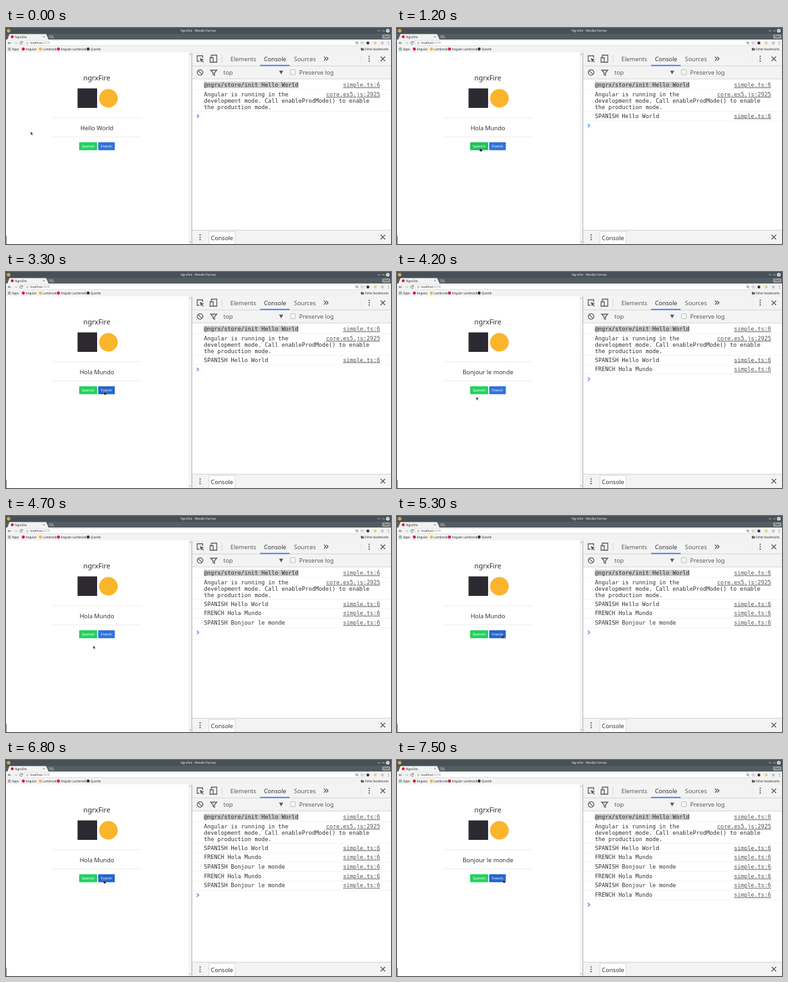
An HTML page that plays this animation: 600x338 px, repeating every 7.6 s.

```html
<!DOCTYPE html>
<html lang="en">
<head>
<meta charset="utf-8">
<title>NgrxFire</title>
<style>
  html, body { margin: 0; width: 100%; height: 100%; overflow: hidden; background: #fff; }
  svg { display: block; width: 100%; height: 100%; }
  text { font-family: "Noto Sans", "Open Sans", sans-serif; fill: #333; white-space: pre; }
  .tiny { font-size: 4.5px; }
  .ui { font-size: 9.25px; fill: #5a5a5a; }
  .mono { font-family: "DejaVu Sans Mono", monospace; font-size: 8.74px; fill: #303030; }
  .link { text-anchor: end; text-decoration: underline; fill: #545454; }
  .mid { text-anchor: middle; }
  .icon { fill: none; stroke: #5a5a5a; stroke-width: 1.3; }
  .nav { fill: none; stroke: #5a5a5a; stroke-width: .8; }
</style>
</head>
<body>
<svg viewBox="0 0 600 338" preserveAspectRatio="none">
  <rect width="600" height="338" fill="#fff"/>

  <!-- window frame and tabs -->
  <rect width="600" height="18.5" fill="#535c61"/>
  <rect width="600" height="9" fill="#475057"/>
  <circle cx="4" cy="4.3" r="2.8" fill="#d9a441"/>
  <text class="tiny mid" x="299.5" y="6" style="fill:#e8eaeb">NgrxFire - Wendle Harrow</text>
  <path d="M579.5 3.5l1.8 1.8 1.8-1.8M586.3 5.3l1.8-1.8 1.8 1.8" fill="none" stroke="#e4e6e7" stroke-width=".8"/>
  <circle cx="595" cy="4.3" r="2.8" fill="#eceeee"/>
  <path d="M594 3.3l2 2m0-2l-2 2" stroke="#475057" stroke-width=".7"/>
  <path d="M2 18.5L5 10.5Q5.4 9.6 6.4 9.6H61.5Q62.5 9.6 63 10.5L66.5 18.5Z" fill="#f2f2f2"/>
  <circle cx="9.7" cy="13.8" r="2.3" fill="#dd1b36"/>
  <text class="tiny" x="14" y="15.6">NgrxFire</text>
  <path d="M57.8 12.5l2.4 2.4m0-2.4l-2.4 2.4" stroke="#555" stroke-width=".6"/>
  <path d="M66 11.2h7.5l2 5h-7.5z" fill="#7c8488"/>
  <rect x="586.5" y="10.2" width="12" height="6.3" rx="1" fill="#a3a9ac"/>
  <text class="tiny mid" x="592.5" y="15">Ned</text>

  <!-- address bar and bookmarks -->
  <rect y="18" width="600" height="20" fill="#f2f2f2"/>
  <rect x="28.5" y="19.5" width="530" height="8" rx="1" fill="#fff" stroke="#c6c6c6" stroke-width=".5"/>
  <path class="nav" d="M8 23.5H3.3m2-2l-2 2 2 2"/>
  <path class="nav" style="stroke:#c2c2c2" d="M12.5 23.5h4.7m-2-2l2 2-2 2"/>
  <path class="nav" d="M25.2 22a2.1 2.1 0 1 0 .4 2M25.8 20.8v1.7h-1.7"/>
  <circle cx="33.3" cy="23.5" r="1.8" fill="none" stroke="#777" stroke-width=".5"/>
  <path d="M33.3 23v1.5" stroke="#777" stroke-width=".6"/>
  <text class="tiny" x="37.8" y="25.2">localhost<tspan fill="#999">:4200</tspan></text>
  <circle class="nav" cx="546.6" cy="23" r="1.5"/><path class="nav" d="M547.8 24.2l1.5 1.5"/>
  <path d="M554.8 21l.7 1.6 1.7.1-1.3 1.1.4 1.7-1.5-.9-1.5.9.4-1.7-1.3-1.1 1.7-.1z" fill="none" stroke="#777" stroke-width=".5"/>
  <circle cx="564" cy="23.5" r="2.3" fill="#353535"/>
  <circle cx="575.3" cy="23.5" r="2.3" fill="#e8c98a"/>
  <circle cx="586.5" cy="23.5" r="2.3" fill="#c4c4c4"/>
  <g fill="#666"><circle cx="596" cy="21.5" r=".6"/><circle cx="596" cy="23.5" r=".6"/><circle cx="596" cy="25.5" r=".6"/></g>
  <g id="apps"></g>
  <g id="bookmarks"></g>
  <path d="M553 31h2l.6.7h2.2v3.5H553z" fill="#666"/>
  <text class="tiny" x="559" y="34.6">Other bookmarks</text>

  <!-- page -->
  <rect x="284.5" y="38" width="5" height="300" fill="#f4f4f4"/>
  <path d="M285.6 42l1.4-1.8 1.4 1.8zM285.6 334l1.4 1.8 1.4-1.8z" fill="#999"/>
  <rect y="325" width=".8" height="13" fill="#555"/>
  <text class="mid" x="141.6" y="82.4" font-size="10.8">ngrxFire</text>
  <rect x="111.5" y="94.5" width="30.5" height="30.5" fill="#2c2a30"/>
  <circle cx="159.6" cy="110" r="14.5" fill="#fbb52c"/>
  <path d="M72 140.2H211M72 170.4H211" stroke="#dedede" stroke-width=".6"/>
  <text id="greeting" class="mid" x="141.7" y="159.7" font-size="9.35"></text>
  <rect id="spanish" x="114" y="178.8" width="28" height="12.4" rx="1"/>
  <rect id="french" x="143.6" y="178.8" width="26" height="12.4" rx="1"/>
  <text class="mid" x="128" y="186.8" font-size="5.4" style="fill:#fff">Spanish</text>
  <text class="mid" x="156.6" y="186.8" font-size="5.4" style="fill:#fff">French</text>

  <!-- developer tools -->
  <rect x="290" y="38" width="310" height="42" fill="#f3f3f3"/>
  <path d="M290 59.3H600M290 79.8H600" stroke="#cfcfcf" stroke-width=".8"/>
  <path d="M396 58.6H442" stroke="#3b79e6" stroke-width="1.6"/>
  <path class="icon" d="M306.5 47V43.5H298V52H301.5"/>
  <path d="M302 47l6.5 2.6-2.6 1.1 2.2 2.3-1 .9-2.2-2.3-1 2.4z" fill="#5a5a5a"/>
  <path class="icon" d="M320 46V42.5H328.5V53.5H323.5M318 46.5h5V53.5h-5z"/>
  <path d="M336.6 42V54" stroke="#ccc" stroke-width=".8"/>
  <text class="ui" x="349.8" y="51.5">Elements</text>
  <text class="ui" x="402" y="51.5" style="fill:#333">Console</text>
  <text class="ui" x="448.8" y="51.5">Sources</text>
  <path class="icon" d="M495.5 45l3 3-3 3M499 45l3 3-3 3"/>
  <path d="M553.3 42V54" stroke="#ddd" stroke-width=".6"/>
  <g id="menus" fill="#5a5a5a"></g>
  <path class="icon" d="M583.8 44.7l7 7m0-7l-7 7"/>
  <circle class="icon" cx="302.5" cy="69.6" r="4.3"/><path class="icon" d="M299.5 66.6l6 6"/>
  <path class="icon" d="M319 66h9.5l-3.6 4v4l-2.2-1.3V70z"/>
  <text class="ui" x="338.8" y="72.5">top</text>
  <path d="M425.6 66.8h6.4l-3.2 5.8z" fill="#5a5a5a"/>
  <rect x="443.3" y="65.3" width="7.6" height="7.6" rx="1" fill="#f7f7f7" stroke="#aaa" stroke-width=".8"/>
  <text class="ui" x="456.8" y="72.5">Preserve log</text>
  <rect x="308.3" y="84.2" width="147.6" height="9.8" fill="#c9c9c9"/>
  <g id="log"></g>
  <path id="prompt" d="M297.4 -2.7l3 2.7-3 2.7" fill="none" stroke="#4a86e8" stroke-width="1.3"/>
  <rect x="290" y="316.4" width="310" height="21.6" fill="#f3f3f3"/>
  <path d="M290 316.4H600" stroke="#c8c8c8" stroke-width=".8"/>
  <rect x="316.2" y="318.5" width="40.8" height="20" fill="#fff" stroke="#ccc" stroke-width=".7"/>
  <text class="ui" x="319.3" y="331.6" style="fill:#333">Console</text>
  <path class="icon" d="M583.8 323.7l7 7m0-7l-7 7"/>
  <g id="drawerMenu"></g>
  <path d="M289.7 38V338" stroke="#a8a8a8" stroke-width=".9"/>

  <g id="cursor">
    <path id="arrow" d="M0 0V5.2L1.2 4.2 2.1 6.1 3 5.7 2.1 3.8H3.7Z" fill="#222" stroke="#fff" stroke-width=".3"/>
    <path id="hand" d="M0 .3Q.6-.4 1 .4V2.3L3.7 2.9Q4.3 3.2 4 4.2L3.3 6.2H.8L-1.1 3.6Q-.8 2.9 0 3.5Z" fill="#222" stroke="#fff" stroke-width=".3"/>
  </g>
</svg>
<script>
const LOOP = 7600, STEP = 100, ROW = 14.72;
const $ = id => document.getElementById(id);

const phrases = { HELLO: "Hello World", SPANISH: "Hola Mundo", FRENCH: "Bonjour le monde" };
const clicks = [
  [1000, "SPANISH"], [3500, "FRENCH"], [4500, "SPANISH"],
  [5400, "FRENCH"], [6600, "SPANISH"], [7400, "FRENCH"]
];

// Cursor waypoints: time, x, y
const path = [
  [0, 38.5, 162], [300, 95, 207], [600, 162, 196], [900, 130, 186], [1200, 129, 187],
  [1400, 152, 213], [1600, 225, 233], [1900, 360, 252], [2300, 437, 176], [2400, 416, 183],
  [2800, 250, 203], [3200, 152, 186], [3600, 155, 186], [3900, 141, 199], [4200, 123.5, 195],
  [4500, 128, 186], [4800, 140, 211], [5200, 163, 185], [5500, 163, 185], [5800, 150, 201],
  [6200, 122, 195], [6500, 129, 186], [6600, 131, 186], [6800, 152, 187],
  [7100, 158, 188], [7300, 163, 186], [7600, 166, 186]
];

const logLine = (text, y, source) =>
  `<text class="mono" x="308.5" y="${y}">${text}</text>` +
  (source ? `<text class="mono link" x="583" y="${y}">${source}</text>` : "");
const divider = y => `<path d="M290 ${y}H600" stroke="#ececec" stroke-width=".7"/>`;
const kebab = (x, y) => [-3.7, 0, 3.7]
  .map(dy => `<circle cx="${x}" cy="${y + dy}" r="1.1" fill="#5a5a5a"/>`).join("");

function buildStatic() {
  for (let i = 0; i < 9; i++) {
    const x = 3 + i % 3 * 1.6, y = 30.7 + Math.floor(i / 3) * 1.6;
    const color = ["#d9534f", "#4f9e58", "#4a7fd0"][i % 3];
    $("apps").innerHTML += `<rect x="${x}" y="${y}" width="1.2" height="1.2" fill="${color}"/>`;
  }
  $("bookmarks").innerHTML = '<text class="tiny" x="9.6" y="34.6">Apps</text>' + [
    [27, "Angular", "#dd1b36"], [53.5, "Lumbrook", "#f5b335"],
    [81.7, "Angular Lumbrook", "#dd1b36"], [128, "Quemb", "#3c2f3c"]
  ].map(([x, label, color]) =>
    `<circle cx="${x}" cy="33" r="2.4" fill="${color}"/><text class="tiny" x="${x + 3.8}" y="34.6">${label}</text>`
  ).join("");
  $("menus").innerHTML = kebab(566, 48);
  $("drawerMenu").innerHTML = kebab(302.5, 327.5);
}

const startLog =
  logLine("@ngrx/store/init Hello World", 92, "simple.ts:6") + divider(96.3) +
  logLine("Angular is running in the", 106.8, "core.es5.js:2925") +
  logLine("development mode. Call enableProdMode() to enable", 116.8) +
  logLine("the production mode.", 126.9) + divider(130.5);

function cursorAt(t) {
  const i = path.findIndex(p => p[0] > t);
  const [t0, x0, y0] = path[i - 1], [t1, x1, y1] = path[i];
  const k = (t - t0) / (t1 - t0);
  return [x0 + (x1 - x0) * k, y0 + (y1 - y0) * k];
}

function paintButton(id, left, right, [x, y], color, hoverColor) {
  const hover = x >= left && x <= right && y >= 178.8 && y <= 191.2;
  $(id).setAttribute("fill", hover ? hoverColor : color);
  return hover;
}

let shownRows = -1;
function showLog(count) {
  if (count === shownRows) return;
  shownRows = count;
  let previous = "HELLO", html = startLog;
  clicks.slice(0, count).forEach(([, action], i) => {
    html += logLine(`${action} ${phrases[previous]}`, 140.5 + ROW * i, "simple.ts:6") + divider(145.2 + ROW * i);
    previous = action;
  });
  $("log").innerHTML = html;
  $("greeting").textContent = phrases[previous];
  $("prompt").setAttribute("transform", `translate(0 ${137.9 + ROW * count})`);
}

function render(now) {
  const t = Math.floor(now % LOOP / STEP) * STEP;
  const tip = cursorAt(t);
  showLog(clicks.filter(([time]) => time <= t).length);
  const onSpanish = paintButton("spanish", 114, 142, tip, "#23d160", "#20c259");
  const onFrench = paintButton("french", 143.6, 169.6, tip, "#3273dc", "#2565cf");
  const over = onSpanish || onFrench;
  $("hand").style.display = over ? "" : "none";
  $("arrow").style.display = over ? "none" : "";
  $("cursor").setAttribute("transform", `translate(${tip})`);
}

buildStatic();
const start = performance.now();
function tick() {
  render(performance.now() - start);
  requestAnimationFrame(tick);
}
tick();
</script>
</body>
</html>
```
